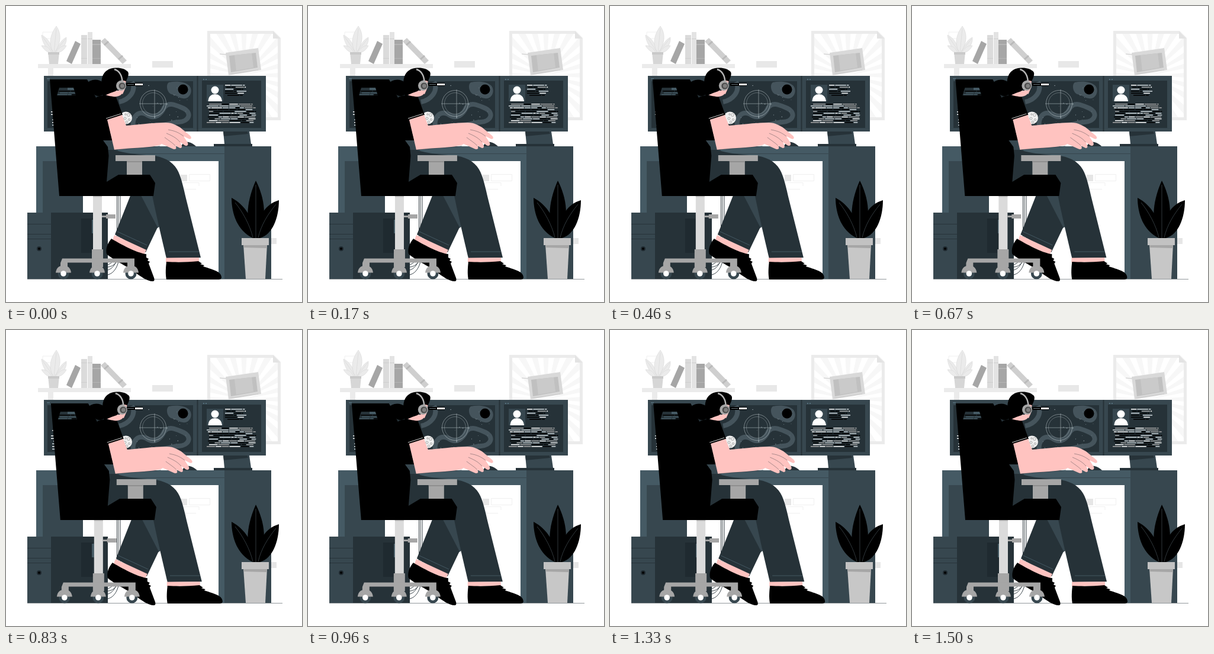
Recreate the animation shown at these times as an HTML page. Size 500 px wide and 500 px high, loop 1540 ms.

```html
<!DOCTYPE html>
<html lang="en">
<head>
<meta charset="utf-8">
<title>Desk</title>
<style>
html, body { margin: 0; width: 100%; height: 100%; overflow: hidden; background: #fff; }
svg { display: block; width: 100vw; height: 100vh; }
.dark { fill: #263238; }
.mid { fill: #37474f; }
.light { fill: #455a64; }
.skin { fill: #ffc3c0; }
.grey { fill: #a6a6a6; }
.line { fill: none; stroke: #263238; stroke-width: .5; }
.cable { fill: none; stroke: #263238; stroke-width: .9; }
.vein { fill: none; stroke: #607078; stroke-width: .5; }
</style>
</head>
<body>
<svg viewBox="0 0 500 500">
  <defs>
    <clipPath id="paper"><path d="M345 47H452L459 55V188H345Z"/></clipPath>
    <clipPath id="space"><path d="M133 127H316V206H133Z"/></clipPath>
  </defs>

  <g id="wall">
    <path fill="#ebebeb" d="M54 98H211V105H54ZM71 105H80V118H71Z"/>
    <path fill="none" stroke="#f0f0f0" d="M62 55V44H88V55Z"/>
    <g fill="#ebebeb" stroke="#d2d2d2" stroke-width=".5">
      <path d="M79 79C66 72 61 60 60 49C71 54 78 66 79 79Z"/>
      <path d="M82 79C89 66 94 56 102 53C103 65 96 74 82 79Z"/>
      <path d="M80 79C71 62 75 48 85 34C95 48 92 64 82 79Z"/>
      <path d="M77 79C70 79 64 74 60 67C68 66 75 72 77 79ZM84 79C88 71 95 66 102 67C98 75 92 79 84 79Z"/>
      <path d="M81 79L85 38M79 77L62 52M83 77L101 55"/>
    </g>
    <path fill="#d6d6d6" d="M71 78H90L88 98H73Z"/>
    <path fill="#c9c9c9" d="M71 78H90V82H71Z"/>
    <path fill="#a6a6a6" d="M117 59L126 64L111 98L102 93Z"/>
    <path fill="#dbdbdb" d="M127 49H137V98H127Z"/>
    <path fill="#e3e3e3" d="M138 44H146V98H138Z"/>
    <path fill="#cfcfcf" d="M127 55H137V56H127ZM127 88H137V89H127ZM138 55H146V56H138Z"/>
    <path fill="#a6a6a6" d="M146 57H160V98H146Z"/>
    <path fill="#b5b5b5" d="M146 64H160V66H146ZM146 88H160V89H146Z"/>
    <path fill="#cfcfcf" d="M160 60L167 54L204 92L197 98Z"/>
    <path fill="#bababa" d="M165 65L172 59L174 61L167 67ZM189 89L196 83L198 85L191 91Z"/>
    <path fill="#e8e8e8" d="M247 93H282V104H247Z"/>
    <path fill="#ebebeb" d="M340 42H452L464 54V193H340Z"/>
    <path fill="#fff" d="M345 47H451V55H459V188H345Z"/>
    <g id="rays" fill="#f7f7f7" clip-path="url(#paper)"></g>
    <path fill="#e3e3e3" d="M451 43L463 55H451Z"/>
    <path fill="#d9d9d9" d="M371 79L426 71L431 108L376 117Z"/>
    <path fill="#c0c0c0" d="M377 84L422 79L425 104L380 112Z"/>
    <path fill="#cacaca" d="M386 83L415 80L418 104L389 109Z"/>
    <path fill="none" stroke="#c9c9c9" d="M361 81L372 82M379 115L426 108"/>
    <path fill="#e6e6e6" d="M295 285H306V296H295ZM448 392H457V402H448Z"/>
    <path fill="none" stroke="#f0f0f0" d="M309.500 284.500H344.500V295.500H309.500ZM300 298.500H326V304M300 309.500H321"/>
  </g>

  <g id="screens">
    <path class="mid" d="M64 118H323V212H64ZM324 118H439V212H324Z"/>
    <path class="dark" d="M70 127H128V206H70ZM133 127H316V206H133ZM331 126H431V206H331ZM322.500 118H324.500V212H322.500Z"/>
    <path fill="#546e7a" d="M69 122H74V123.500H69ZM333 123H335V125H333ZM337 123H339V125H337Z"/>
    <path fill="#455a64" d="M104 138H121V142H104Z"/>
    <g id="notes"></g>
    <g clip-path="url(#space)">
      <path fill="#45545c" d="M275 129C288 126 304 128 310 135C317 145 309 158 299 156C290 155 288 150 279 149C271 145 270 132 275 129Z"/>
      <path fill="none" stroke="#45545c" stroke-width="8" d="M213 128C221 144 207 159 191 162M216 207C211 190 222 175 237 183C252 194 263 181 267 172C275 160 290 169 300 173C315 181 309 195 292 196C278 197 270 202 252 201"/>
      <g id="stars" fill="#b0bec5"></g>
      <g fill="none" stroke="#cfd8dc" stroke-width=".6" opacity=".8">
        <circle cx="248.500" cy="164.500" r="22"/>
        <circle cx="248.500" cy="164.500" r="18" stroke-width=".4"/>
        <path d="M225 165H273M251 141V190"/>
      </g>
    </g>
    <circle cx="299" cy="141" r="8.500"/>
    <path d="M203 130H231V135H203Z"/>
    <path fill="#fff" d="M218 131H231V134H218Z"/>
    <path fill="#69757b" d="M205 132H216V133H205Z"/>
    <g fill="none" stroke="#9c9c9c" stroke-width=".8">
      <circle cx="202.500" cy="189" r="10.500" fill="#f0f0f0" stroke="none"/>
      <circle cx="207" cy="184" r="2.400"/><circle cx="201" cy="190" r="2"/>
      <circle cx="208" cy="192" r="1.600"/><circle cx="202" cy="183" r="1.300"/>
      <circle cx="204" cy="196" r="1.800"/>
    </g>
    <path class="mid" d="M339 133H367V161H339Z"/>
    <circle cx="353" cy="142" r="6.500" fill="#fff"/>
    <path fill="#fff" d="M341.500 161C342 152 347 149 353 149S364 152 365 161Z"/>
    <g id="code"></g>
  </g>

  <g id="desk">
    <path class="mid" d="M51 237H448V262H51ZM369 237H448V461H369Z"/>
    <path class="light" d="M51 237H369V262H51ZM51 262H62V349H51ZM359 262H369V461H359Z"/>
    <path class="mid" d="M62 262H130V350H62Z"/>
    <path class="line" d="M119 249.500H369"/>
    <path class="mid" d="M367 212H411L414 233H369Z"/>
    <path class="dark" d="M367 212H408L409 216L368 220ZM351 233H416V237H351Z"/>
    <path class="line" d="M36 461.500H467"/>
    <path class="mid" d="M36 349H76V461H36Z"/>
    <path class="dark" d="M76 349H172V461H76Z"/>
    <path fill="#1f2a30" d="M127 359H147V417H127Z"/>
    <path fill="#455a64" d="M145 361H149V384H145Z"/>
    <path class="cable" d="M36 368.500H76M36 385.500H76M36 393.500H76"/>
    <circle cx="56" cy="410" r="4" fill="#1f2a30"/><circle cx="56" cy="410" r="2"/>
    <path class="cable" d="M187.500 320V400C187 420 184 433 172 437M190 320V405C189 430 184 442 172 446M193 320V410C192 437 184 451 172 454M172 441C181 440 187 434 188 428"/>
  </g>

  <g id="sitter">
    <path fill="#dbdbdb" d="M147 320H162V412H147Z"/>
    <path fill="#c4c4c4" d="M147 320H162V323H147Z"/>
    <path class="grey" d="M162 354H169V357H162ZM169 352H185V359H169Z"/>

    <path class="mid" d="M222 318H249L259 373L254 376Z"/>
    <path class="dark" d="M211 318H227L256 374L236 416L184 386Z"/>
    <path class="skin" d="M183 387L237 412L233 420L179 398Z"/>
    <path d="M178 393C171 402 168 410 170 419C180 428 205 440 215 448C228 457 238 465 248 465C251 465 251 462 250 459L241 435L243 432L239 430L241 427L237 425L237 419C224 418 200 406 178 393Z"/>
    <path class="mid" d="M162 226H182L190 246H162Z"/>
    <path class="dark" d="M166 243H183C200 249 225 251 245 252.500C265 254 281 262 289 276C296 288 300 308 304 325L329 425L271 426C264 396 253 350 246 315L230 300H166Z"/>
    <path fill="none" stroke="#607d8b" stroke-width=".5" d="M275 415H326M188 381L238 404"/>
    <path class="skin" d="M270 425.500L326 425V432L270 433Z"/>
    <path d="M271 432C286 433 305 433 325 431L331 435L328 436L335 438L333 440L340 442C350 446 363 448 364 458C364 461 362 462 358 462H271C269 452 270 441 271 432Z"/>

    <path d="M74 124H137L141 132L152 155C159 149 177 151 186 154L197 184L171 193L180 227H164L172 238L173.500 253L170 297L190 285H243L252 299L249 321H90ZM90 138H114L118 151H86Z" fill-rule="evenodd"/>
    <path class="grey" d="M185 252H252V262H185ZM204 262H230V285H204Z"/>
    <path fill="#8f8f8f" d="M204 262H230V264H204Z"/>

    <path class="grey" d="M145 411H164V428H145Z"/>
    <path class="grey" d="M95 426.500H217V433.500H164V441H145V433.500H104V441H92V434ZM205 433H217V441H205Z"/>
    <g id="wheels"></g>

    <path class="dark" d="M296 237C299 229 309 226 321 237Z"/>
    <path class="skin" d="M171 192L196 184L203 202C221 201 245 197 270 197C282 197 288 202 294 205L311 219C315 223 312 226 308 224L300 220L307 231C309 236 304 238 300 234L294 230C297 235 299 240 294 240L286 236C290 242 285 243 281 241L263 233C256 239 220 239 183 243Z"/>
    <path fill="none" stroke="#263238" stroke-width=".4" d="M274 209C286 211 292 214 300 220M271 215C283 220 289 224 294 230M268 222C276 228 281 231 286 236M183 243C220 239 250 240 260 236"/>
    <path fill="none" stroke="#fff" stroke-width=".8" d="M169 190L194 182"/>

    <path class="skin" d="M166 143H197C198 151 188 154 181 153C174 152 168 151 166 147Z"/>
    <path class="skin" d="M196 123H203L201 140L197 149L190 145Z"/>
    <path d="M162 137C159 118 167 105 185 104.500C194 104 202 107 203 109C210 112 206 120 203 127L194 125C189 129 191 139 185 144C177 147 169 149 165 153C162 150 162 144 162 137Z"/>
    <path d="M137 133C139 123 157 122 163 129L166 146C163 154 151 154 147 147C140 146 137 140 137 133Z"/>
    <path fill="none" stroke="#b5b5b5" stroke-width="2.500" d="M183 107C191 109 196 117 196.500 128"/>
    <circle cx="194.500" cy="134.500" r="8.500" class="grey"/>
    <circle cx="196" cy="135" r="5.500" fill="#4a4a4a"/>
    <circle cx="196.500" cy="135" r="3.500" fill="#7d7d7d"/>
  </g>

  <g id="plant">
    <path d="M420 392C400 364 409 324 422 295C437 324 443 362 424 392Z"/>
    <path d="M417 392C391 380 381 351 381 324C404 336 419 360 421 392Z"/>
    <path d="M423 392C425 352 439 335 461 328C461 358 450 386 429 392Z"/>
    <path class="vein" d="M422 302V392M387 332C400 348 412 370 417 391M456 335C442 352 431 370 426 391"/>
    <path fill="#c7c7c7" d="M401 403H441L438 461H405Z"/>
    <path fill="#a6a6a6" d="M401 403H441L440.500 409L402 408Z"/>
    <path fill="#c2c2c2" d="M398 392H444V404H398Z"/>
  </g>
</svg>
<script>
const SVG = 'http://www.w3.org/2000/svg';
const $ = id => document.getElementById(id);

function add(parent, tag, attrs) {
  const el = document.createElementNS(SVG, tag);
  for (const k in attrs) el.setAttribute(k, attrs[k]);
  return parent.appendChild(el);
}

let seed = 11;
const rand = () => (seed = (seed * 16807) % 2147483647) / 2147483647;

// Rows of short bars that read as lines of code
function bars(parent, x0, x1, y0, y1, gap, colors) {
  for (let y = y0; y <= y1; y += gap) {
    let x = x0 + Math.floor(rand() * 3) * 2;
    const end = x1 - rand() * 10;
    while (x < end) {
      const width = Math.min(4 + rand() * 17, end - x);
      const fill = colors[Math.floor(rand() * colors.length)];
      add(parent, 'rect', { x, y, width, height: 1.5, fill });
      x += width + 1;
    }
  }
}

const INK = ['#fff', '#000', '#cfd8dc', '#000', '#a6a6a6'];
bars($('code'), 370, 408, 133, 151, 3.4, INK);
bars($('code'), 339, 424, 165, 197, 3.1, INK);
bars($('notes'), 87, 121, 143, 149, 3, ['#fff', '#000', '#455a64']);
bars($('notes'), 76, 120, 169, 201, 4.5, ['#fff', '#cfd8dc']);

for (let i = 0; i < 30; i++) {
  add($('stars'), 'circle', { cx: 215 + rand() * 98, cy: 129 + rand() * 75, r: .3 + rand() * .4 });
}

for (let i = 0; i < 24; i++) {
  add($('rays'), 'path', {
    d: 'M402 117L394 -5H410Z',
    transform: `rotate(${i * 15} 402 117)`
  });
}

for (const x of [97, 154, 211]) {
  const w = $('wheels');
  add(w, 'circle', { cx: x, cy: 452, r: 9.5, class: 'mid' });
  add(w, 'path', { class: 'grey', d: `M${x - 13} 450.5C${x - 12} 442 ${x - 7} 438.5 ${x} 438.5S${x + 12} 442 ${x + 13} 450.5Z` });
  add(w, 'circle', { cx: x, cy: 452, r: 4.8, fill: '#fff' });
}

// Sideways shake: offsets at every tenth of the cycle
const SHAKE = [0, -1, 2, -4, 4, -4, 4, -4, 2, -1, 0];
const CYCLE = 1500, LEAD = 23, LOOP = 1540, STEPS = 37, STEP = 1000 / 24;

function shake(ms) {
  const p = (ms % CYCLE) / CYCLE * 10;
  const i = Math.floor(p);
  return SHAKE[i] + (SHAKE[i + 1] - SHAKE[i]) * (p - i);
}

const sitter = $('sitter');
const REST = shake(LEAD);
const start = performance.now();

function draw(now) {
  const t = Math.max(0, now - start) % LOOP;
  const k = Math.min(STEPS - 1, Math.floor((t + 3) * STEPS / LOOP));
  const x = shake(k * STEP + LEAD) - REST;
  sitter.setAttribute('transform', `translate(${x.toFixed(3)} 0)`);
  requestAnimationFrame(draw);
}
draw(start);
</script>
</body>
</html>
```
